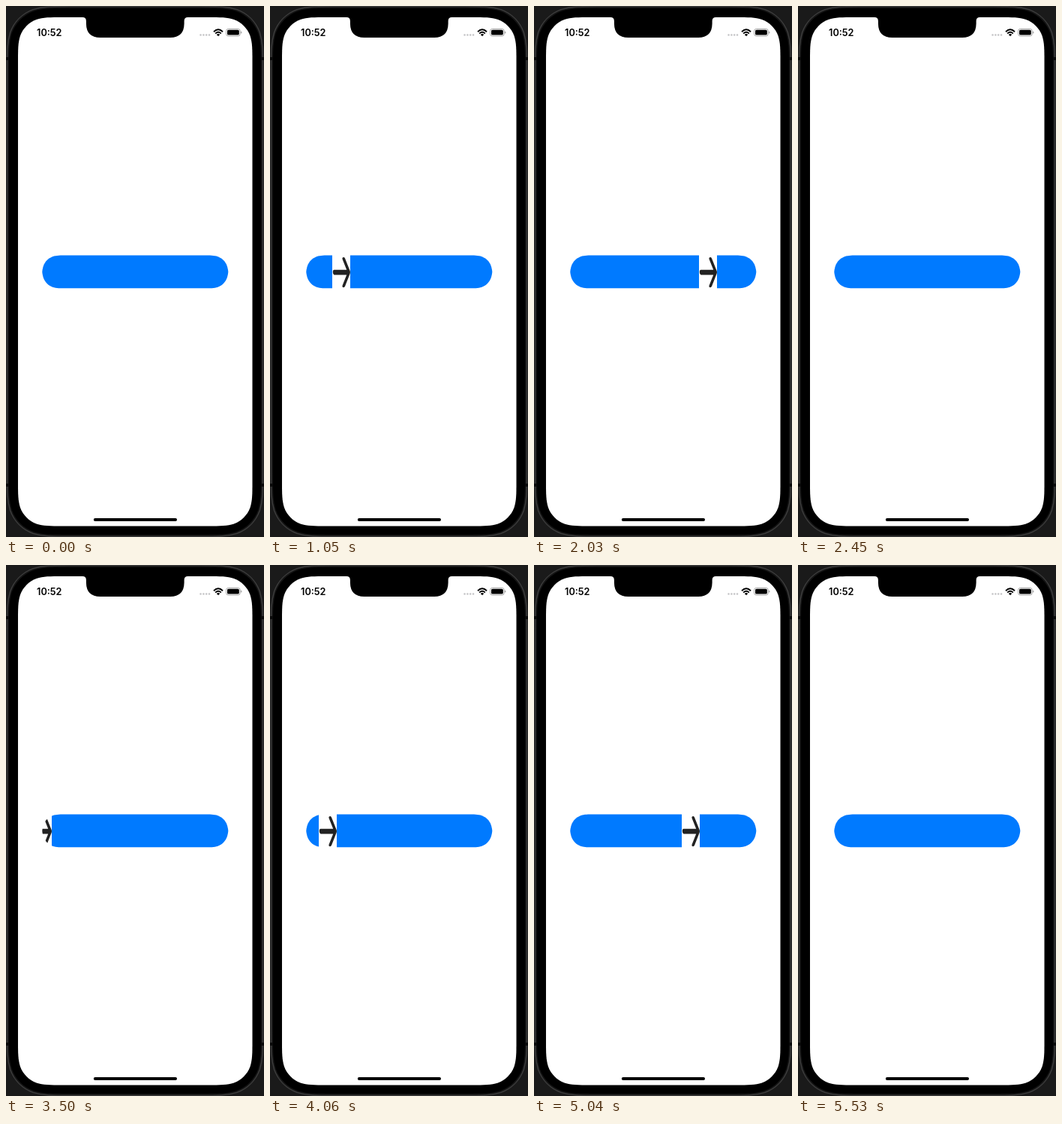
These frames come from a looping animation (344x706 px, 5880 ms). An HTML page:

```html
<!DOCTYPE html>
<html lang="en">
<head>
<meta charset="utf-8">
<title>Arrow sweep</title>
<style>
  html, body { margin: 0; width: 100%; height: 100%; overflow: hidden; background: #1a1a1a; }
  svg { display: block; width: 100%; height: 100%; }
  .time { font: 600 12.7px Inter, Roboto, sans-serif; text-anchor: middle; }
</style>
</head>
<body>
<svg viewBox="0 0 344 706">
  <defs>
    <path id="pill"/>
    <clipPath id="pillClip"><use href="#pill"/></clipPath>
  </defs>

  <!-- phone body -->
  <rect width="344" height="706" fill="#1a1a1a"/>
  <path id="rim" fill="#151515" stroke="#3e3e3e" stroke-width="1.4"/>
  <path id="bezel"/>
  <path d="M0 68h4v4H0zM340 68h4v4h-4zM0 635h4v4H0zM340 635h4v4h-4z" fill="#0a0a0a"/>
  <path id="screen" fill="#fff"/>
  <path d="M102 14.5V15Q106.9 15 106.9 20V23.5Q107.2 42 125.5 42H219Q237.3 42 237.6 23.5V20Q237.6 15 242.5 15V14.5Z"/>

  <!-- status bar -->
  <text class="time" x="57.8" y="40">10:52</text>
  <g fill="#c4c4c6">
    <circle cx="259.5" cy="38.6" r="1.25"/><circle cx="263.4" cy="38.6" r="1.25"/>
    <circle cx="267.2" cy="38.6" r="1.25"/><circle cx="271" cy="38.6" r="1.25"/>
  </g>
  <g fill="none" stroke="#000" stroke-width="1.9">
    <path d="M277 34.2Q283 28.5 289 34.2"/>
    <path d="M279.2 36.6Q283 33 286.8 36.6"/>
  </g>
  <path d="M283 40.3L280.8 38Q283 36.2 285.2 38Z"/>
  <rect x="293.6" y="30.4" width="18.6" height="9.6" rx="2.8" fill="none" stroke="#a0a0a0" stroke-width=".9"/>
  <rect x="295" y="31.8" width="15.8" height="6.8" rx="1.6"/>
  <path d="M313.1 33.6Q314.4 34 314.4 35.2T313.1 36.8Z" fill="#a0a0a0"/>
  <rect x="116.8" y="681" width="111.2" height="4" rx="2"/>

  <!-- button with the sweeping arrow -->
  <use href="#pill" fill="#007aff"/>
  <rect id="gap" y="331" width="24" height="45" fill="#fff" visibility="hidden"/>
  <g clip-path="url(#pillClip)">
    <path id="arrow" visibility="hidden" fill="#222" d="M13.6 334.8Q15.5 333 17 335.4L23.6 352Q24.3 354 23.6 356L17 372.8Q15.5 375.2 13.6 373.4Q13.2 372.4 13.7 371.2L19.2 357.4H2.5Q.8 357 .8 354Q.8 350.8 2.5 350.8H19.2L13.7 337Q13.2 335.8 13.6 334.8Z"/>
  </g>
</svg>
<script>
  const LOOP = 5880, STEP = 70;
  const el = id => document.getElementById(id);

  // rectangle with continuous-curvature corners; the blend is capped on short sides
  function smoothRect(id, x, y, w, h, r) {
    const corner = (cx, cy, sx, sy, down) => {
      const px = v => cx + sx * r * v, py = v => cy + sy * r * v;
      const end = Math.min(1.5287, h / 2 / r), pull = Math.min(1.0885, end);
      const pts = [
        [end > 1.5 ? 1.5287 : 1.5287, 0], [1.0885, 0], [.8684, 0], [.6315, .0749],
        [.3728, .1691], [.1691, .3728], [.0749, .6315],
        [0, .8684], [0, pull], [0, end]
      ];
      if (!down) pts.reverse();
      const p = pts.map(([a, b]) => `${px(a)} ${py(b)}`);
      return `L${p[0]}C${p.slice(1).join(' ')}`;
    };
    const d = corner(x, y, 1, 1, false) + corner(x + w, y, -1, 1, true) +
      corner(x + w, y + h, -1, -1, false) + corner(x, y + h, 1, -1, true);
    el(id).setAttribute('d', 'M' + d.slice(1) + 'Z');
  }

  smoothRect('rim', 1.5, .5, 341, 705, 55);
  smoothRect('bezel', 4, 3, 336, 700, 52);
  smoothRect('screen', 16, 15, 312.5, 676.4, 39);
  smoothRect('pill', 48.3, 331.6, 248, 43.7, 21.85);

  // [ms into the sweep, left edge of the arrow]
  const path = [
    [0, 33], [70, 37], [350, 48], [630, 65], [770, 83], [1050, 116],
    [1190, 130], [1330, 151], [1820, 231], [2100, 275]
  ];

  // visible interval and time base of each sweep
  const sweeps = [
    { from: 280, to: 2450, base: 280 },
    { from: 3500, to: 5530, base: 3430 }
  ];

  const moving = [el('gap'), el('arrow')];

  function leftAt(ms) {
    const i = Math.max(1, path.findIndex(p => p[0] >= ms));
    const [t0, x0] = path[i - 1], [t1, x1] = path[i];
    return Math.round(x0 + (x1 - x0) * (ms - t0) / (t1 - t0));
  }

  function draw(now) {
    const t = Math.floor((now % LOOP) / STEP) * STEP;
    const sweep = sweeps.find(s => t >= s.from && t < s.to);
    for (const part of moving) {
      part.setAttribute('visibility', sweep ? 'visible' : 'hidden');
      if (sweep) part.setAttribute('transform', `translate(${leftAt(t - sweep.base)} 0)`);
    }
  }

  const start = performance.now();
  function tick() {
    draw(performance.now() - start);
    requestAnimationFrame(tick);
  }
  tick();
</script>
</body>
</html>
```
